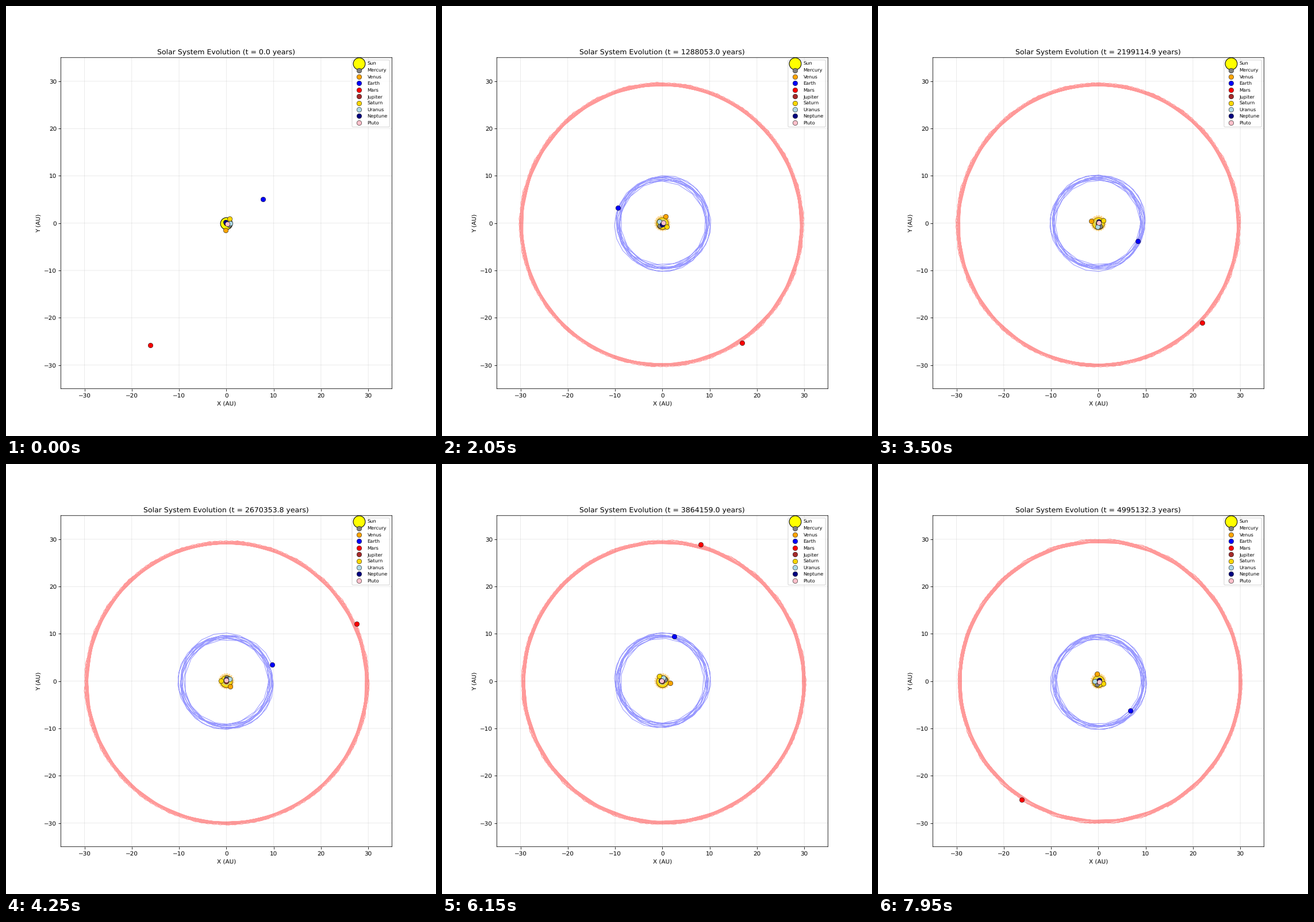
These frames come from a looping animation (748 px wide and 748 px high, 8 s). A matplotlib script:

```python
import numpy as np
import matplotlib.pyplot as plt
from matplotlib.animation import FuncAnimation

FRAMES = 160
STEPS = 5        # orbit samples per frame
TRAIL = 200      # samples kept in a trail
YEARS = 1e4 * np.pi

plt.rcParams.update({"text.hinting": "none", "path.snap": False})

s = np.arange(FRAMES * STEPS)
frame = s / STEPS


def modes(*terms):
    """Eccentricity vector as a sum of (size, degrees per frame, phase)."""
    return sum(a * np.exp(1j * np.radians(g * frame + p)) for a, g, p in terms)


def orbit(axis, start, step, ecc=0, swing=0):
    """Position and velocity on a Kepler ellipse, `step` degrees per sample."""
    ecc = ecc + np.zeros(s.size, complex)
    e, peri = np.abs(ecc), np.angle(ecc)
    lon = start + step * s + swing * np.sin(np.pi * frame / 190) ** 2
    m = np.radians(lon) - peri
    f = m + 2 * e * np.sin(m) + 1.25 * e ** 2 * np.sin(2 * m)
    p = axis * (1 - e ** 2)
    heading = np.exp(1j * (f + peri))
    return p / (1 + e * np.cos(f)) * heading, 1j * (heading + ecc) / np.sqrt(p)


a_pos, a_vel = orbit(0.723, -33, 189.178)
b_pos, b_vel = orbit(1.524, 274, 246.562, modes((0.08, 24.9, 336)))
c_pos, c_vel = orbit(9.56, 38, -18.678, modes((0.033, 5.913, 30.7),
                                              (0.0482, 39.23, 127.9)))
d_pos, d_vel = orbit(30.07, 238.4, 24.9016, modes((0.0125, 0.95, 40)), 3.6)

bodies = [
    ("Mercury", "gray", a_pos),
    ("Venus", "orange", b_pos),
    ("Earth", "blue", c_pos),
    ("Mars", "red", d_pos),
    ("Jupiter", "brown", 0 * a_pos),
    ("Saturn", "gold", a_vel),
    ("Uranus", "lightblue", b_vel),
    ("Neptune", "navy", c_vel),
    ("Pluto", "pink", d_vel),
]

fig, ax = plt.subplots(figsize=(10, 10), dpi=74.8)
ax.set_xlim(-35, 35)
ax.set_ylim(-35, 35)
ax.set_aspect("equal")
ax.grid(True, alpha=0.3)
ax.set_xlabel("X (AU)")
ax.set_ylabel("Y (AU)")
title = ax.set_title("")


def dot(label, color, size, edge):
    return ax.plot([0], [0], "o", color=color, ms=size, mec="black",
                   mew=edge, label=label)[0]


dot("Sun", "yellow", 20, 1)
trails = [ax.plot([], [], color=c, alpha=0.4, lw=1)[0] for _, c, _ in bodies]
dots = [dot(name, c, 8, 0.5) for name, c, _ in bodies]
ax.legend(loc="upper right", fontsize=8, labelspacing=0.433)


def update(i):
    now = i * STEPS
    for (_, _, path), trail, mark in zip(bodies, trails, dots):
        part = path[max(0, now - TRAIL):now + 1]
        trail.set_data(part.real, part.imag)
        mark.set_data([path[now].real], [path[now].imag])
    title.set_text(f"Solar System Evolution (t = {i * YEARS:.1f} years)")
    return trails + dots + [title]


anim = FuncAnimation(fig, update, frames=FRAMES, interval=50, repeat=True,
                     repeat_delay=0, blit=False)
plt.show()
```
